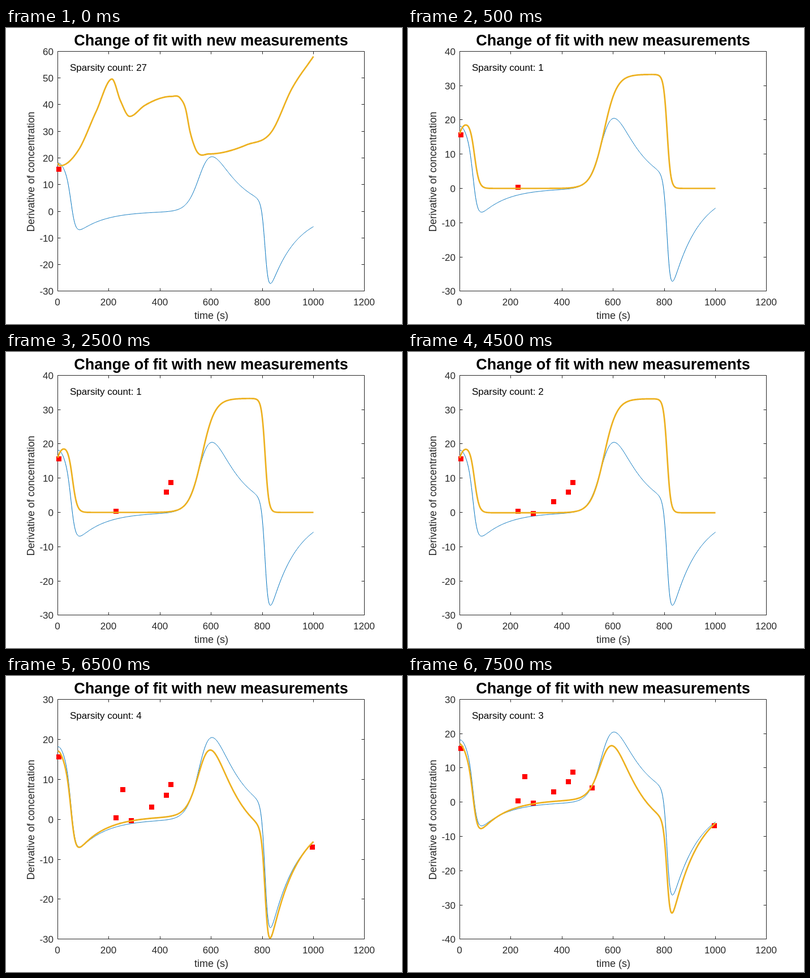
Recreate the animation shown at these times as an HTML page with a canvas. Size 700 by 525 pixels, loop 8000 ms.

```html
<!DOCTYPE html>
<html lang="en">
<head>
<meta charset="utf-8">
<title>Change of fit</title>
<style>
  html, body { margin: 0; width: 100%; height: 100%; overflow: hidden; background: #fff; }
  canvas { display: block; }
</style>
</head>
<body>
<canvas id="stage" width="700" height="525"></canvas>
<script>
const ctx = document.getElementById('stage').getContext('2d');
const LOOP = 8000;
const END = 1000;
const DECAY = 0.0096;
const box = { left: 91.5, right: 633.9, top: 41.4, bottom: 466.85 };
const FONT = '"Liberation Sans", Arial, sans-serif';
const INK = '#262626';

const sigmoid = z => 1 / (1 + Math.exp(-z));

// Two bursts of production; a lag delays everything but the final drop.
function production(t, lag = 0) {
  const u = t - lag;
  const first = (23 - 3.1 * Math.exp(-u / 14)) * sigmoid((53 - u) / 9);
  const second = 39 * sigmoid((u - 559.5) / 25) * sigmoid((811 - t) / 7);
  return first + second;
}

// Concentration follows production minus first-order decay.
function simulate() {
  const states = [];
  let amount = 185;
  for (let t = 0; t <= END; t++) {
    const made = production(t), lost = DECAY * amount;
    states.push({ made, lost });
    amount += made - lost;
  }
  return states;
}
const states = simulate();

const balance = (gain, loss, offset) => t =>
  gain * states[t].made - loss * states[t].lost + offset;
const bursts = offset => t => 0.853 * production(t, 4.5) + offset;

// Smooth cubic through a few points, level at the extremes.
function spline(points) {
  const secant = i => (points[i + 1][1] - points[i][1]) / (points[i + 1][0] - points[i][0]);
  const last = points.length - 1;
  const slopes = points.map(([t], i) => {
    if (i === 0) return secant(0);
    if (i === last) return secant(last - 1);
    const a = secant(i - 1), b = secant(i);
    if (a * b <= 0) return 0;
    const before = t - points[i - 1][0], after = points[i + 1][0] - t;
    return (a * after + b * before) / (before + after);
  });
  return t => {
    const i = Math.max(1, points.findIndex(p => p[0] >= t));
    const [t0, v0] = points[i - 1], [t1, v1] = points[i];
    const h = t1 - t0, s = (t - t0) / h, r = 1 - s;
    return v0 * r * r * (1 + 2 * s) + v1 * s * s * (3 - 2 * s)
      + h * s * r * (slopes[i - 1] * r - slopes[i] * s);
  };
}

const pairs = list => list.split(' ').map(p => p.split(',').map(Number));
const measured = balance(1, 1, 0);
const overfit = spline(pairs('0,18 10,17.1 80,22.8 150,37.4 212,49.6 245,41.5 281,35.6 340,39.7 '
  + '446,43.1 480,42.3 500,38.4 517,30 537,23.8 590,21.5 738,24.9 838,30.1 915,45.9 1000,58.1'));
const samples = pairs('5,15.6 229,0.3 425,5.9 443,8.6 288,-0.4 368,3 255,7.4 996,-7 519,4.1');

// Each step shows one more sample than the step before.
const steps = [
  { at: 0,    count: 27, fit: overfit,                  low: -30, high: 60 },
  { at: 500,  count: 1,  fit: bursts(0),                low: -30, high: 40 },
  { at: 1500, count: 2,  fit: bursts(-0.1),             low: -30, high: 40 },
  { at: 2500, count: 1,  fit: bursts(0),                low: -30, high: 40 },
  { at: 3500, count: 1,  fit: bursts(0),                low: -30, high: 40 },
  { at: 4500, count: 2,  fit: bursts(-0.1),             low: -30, high: 40 },
  { at: 5500, count: 2,  fit: bursts(-0.1),             low: -30, high: 40 },
  { at: 6500, count: 4,  fit: balance(0.92, 1.11, 0.8), low: -30, high: 30 },
  { at: 7500, count: 3,  fit: balance(0.925, 1.2, 0.8), low: -40, high: 30 }
];

const toX = t => box.left + t / 1200 * (box.right - box.left);
const toY = (v, { low, high }) =>
  box.bottom - (v - low) / (high - low) * (box.bottom - box.top);
const crisp = n => Math.round(n - 0.5) + 0.5;

function drawCurve(curve, step, color, width) {
  ctx.beginPath();
  for (let t = 0; t <= END; t += 2) ctx.lineTo(toX(t), toY(curve(t), step));
  ctx.strokeStyle = color;
  ctx.lineWidth = width;
  ctx.lineJoin = 'round';
  ctx.stroke();
}

function label(text, x, y, size, { align = 'center', color = INK, bold = '' } = {}) {
  ctx.font = `${bold} ${size}px ${FONT}`;
  ctx.textAlign = align;
  ctx.fillStyle = color;
  ctx.fillText(text, x, y);
}

function drawAxes(step) {
  const line = (x0, y0, x1, y1) => { ctx.moveTo(x0, y0); ctx.lineTo(x1, y1); };
  const [left, right, top, bottom] =
    [box.left, box.right, box.top, box.bottom].map(crisp);
  ctx.strokeStyle = INK;
  ctx.lineWidth = 1;
  ctx.strokeRect(left, top, right - left, bottom - top);
  ctx.beginPath();
  for (let t = 0; t <= 1200; t += 200) {
    const x = crisp(toX(t));
    line(x, bottom, x, bottom - 5);
    line(x, top, x, top + 5);
    label(t, x - 0.5, 492, 17);
  }
  for (let v = step.low; v <= step.high; v += 10) {
    const y = crisp(toY(v, step));
    line(left, y, left + 5, y);
    line(right, y, right - 5, y);
    label(v, 84, y + 6, 17, { align: 'right' });
  }
  ctx.stroke();

  label('Change of fit with new measurements', 362.5, 31, 27, { color: '#000', bold: 'bold' });
  label('time (s)', 363, 516, 18);
  ctx.save();
  ctx.translate(50, 255);
  ctx.rotate(-Math.PI / 2);
  label('Derivative of concentration', 0, 0, 18);
  ctx.restore();
}

function draw(time) {
  const index = steps.findLastIndex(s => time >= s.at);
  const step = steps[index];
  ctx.fillStyle = '#fff';
  ctx.fillRect(0, 0, 700, 525);
  drawAxes(step);
  drawCurve(measured, step, '#0072bd', 1);
  ctx.fillStyle = '#f00';
  for (const [t, v] of samples.slice(0, index + 1)) {
    ctx.fillRect(Math.floor(toX(t) - 4.5), Math.floor(toY(v, step) - 4.5), 9, 9);
  }
  drawCurve(step.fit, step, '#edb120', 2.7);
  label(`Sparsity count: ${step.count}`, 113, 76, 17, { align: 'left', color: '#000' });
}

function tick() {
  draw(performance.now() % LOOP);
  requestAnimationFrame(tick);
}
tick();
</script>
</body>
</html>
```
